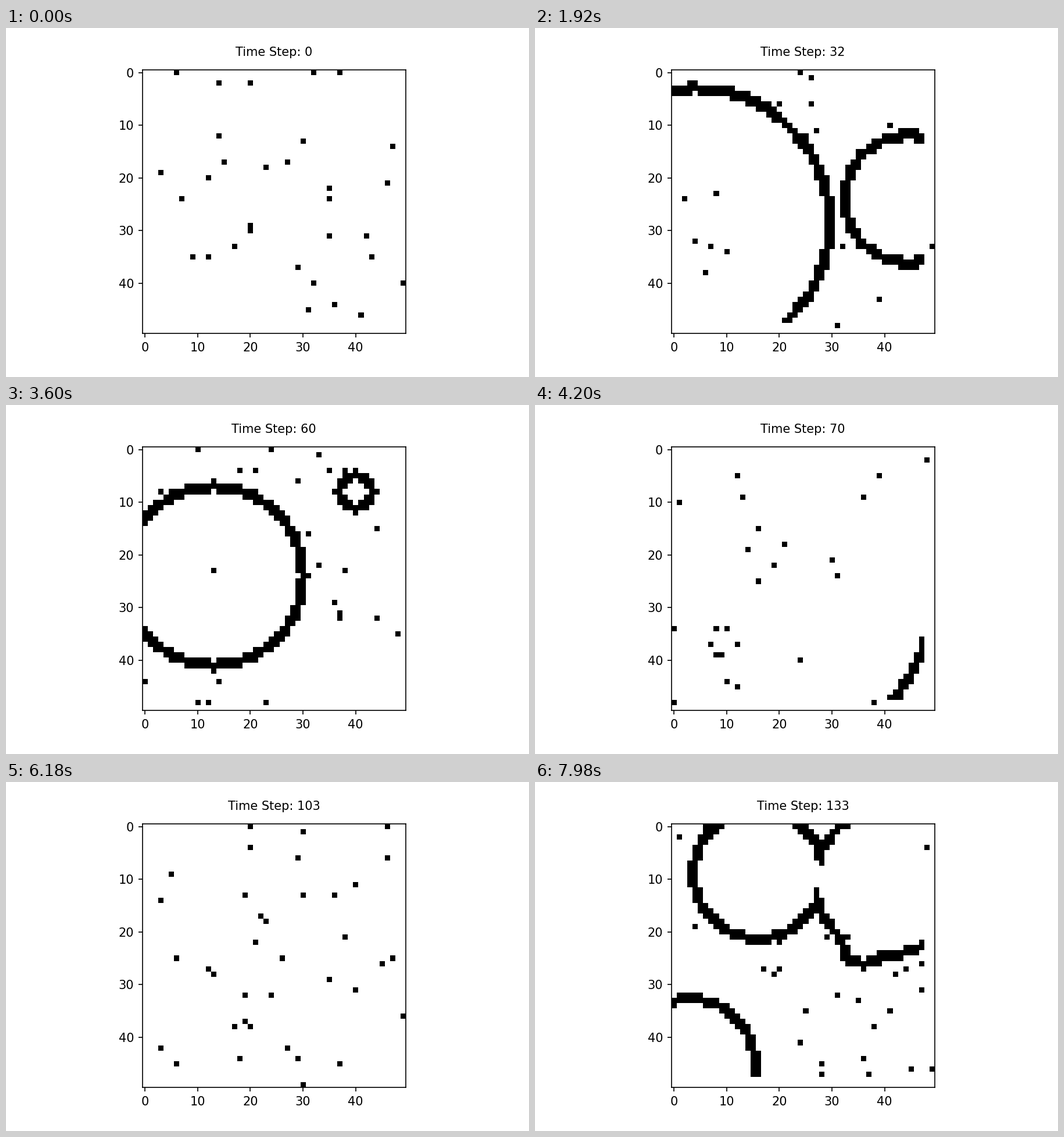
Animation, 900 px wide and 600 px high, one loop 8000 ms. Source, as a matplotlib script:

```python
import numpy as np
import matplotlib.pyplot as plt
from matplotlib.animation import FuncAnimation

N, EDGE = 50, 48          # lattice size, limit reached by the waves
STEPS = 134
SPEED = 2                 # cells a front advances per step
RATE, REST = 0.0145, 7    # spontaneous firing, steps of rest after a front

# Each generation holds wave sources as (column, row, starting step).
GENERATIONS = [
    [(6, 31, 4.3), (44, 11, 9.8)],
    [(4, 28.5, 18.75), (44.5, 24, 25.45)],
    [(9.6, 20, 33.1), (44, 5, 49.2)],
    [(13, 24, 51), (40, 8, 58)],
    [(22, 21, 71)],
    [(16, 9, 126.4), (40.5, 10.5, 125.6), (36, 22, 130.5), (3, 45, 126.35)],
]

rows, cols = np.mgrid[0:N, 0:N]


def arrival(sources):
    """Step at which the first front reaches each cell; meeting fronts stop."""
    times = [start + np.hypot(cols - x, rows - y) / SPEED
             for x, y, start in sources]
    first = np.min(times, axis=0)
    first[(rows >= EDGE) | (cols >= EDGE)] = np.inf
    return first


def simulate():
    rng = np.random.default_rng(7)
    fields = [arrival(g) for g in GENERATIONS]
    last = np.full((N, N), -REST - 1)
    history = []
    for t in range(STEPS):
        front = np.any([(f > t - 1) & (f <= t) for f in fields], axis=0)
        last[front] = t
        noise = (rng.random((N, N)) < RATE) & (t - last > REST)
        history.append((front | noise).astype(float))
    return history


history = simulate()

fig = plt.figure(figsize=(6, 4), dpi=150, facecolor="white")
ax = fig.add_axes([234.75 / 900, 0.125, 453 / 900, 0.755])
image = ax.imshow(history[0], cmap="binary", vmin=0, vmax=1, aspect="auto",
                  interpolation="nearest")
ax.set_xticks(range(0, N, 10))
ax.set_yticks(range(0, N, 10))
title = ax.text(0.5, 1.052, "", ha="center", transform=ax.transAxes)


def update(frame):
    step = min(frame // 3, STEPS - 1)   # three 20 ms frames per step
    image.set_data(history[step])
    title.set_text(f"Time Step: {step}")
    return image, title


anim = FuncAnimation(fig, update, frames=400, interval=20, repeat=True,
                     repeat_delay=0, blit=False)
plt.show()
```
